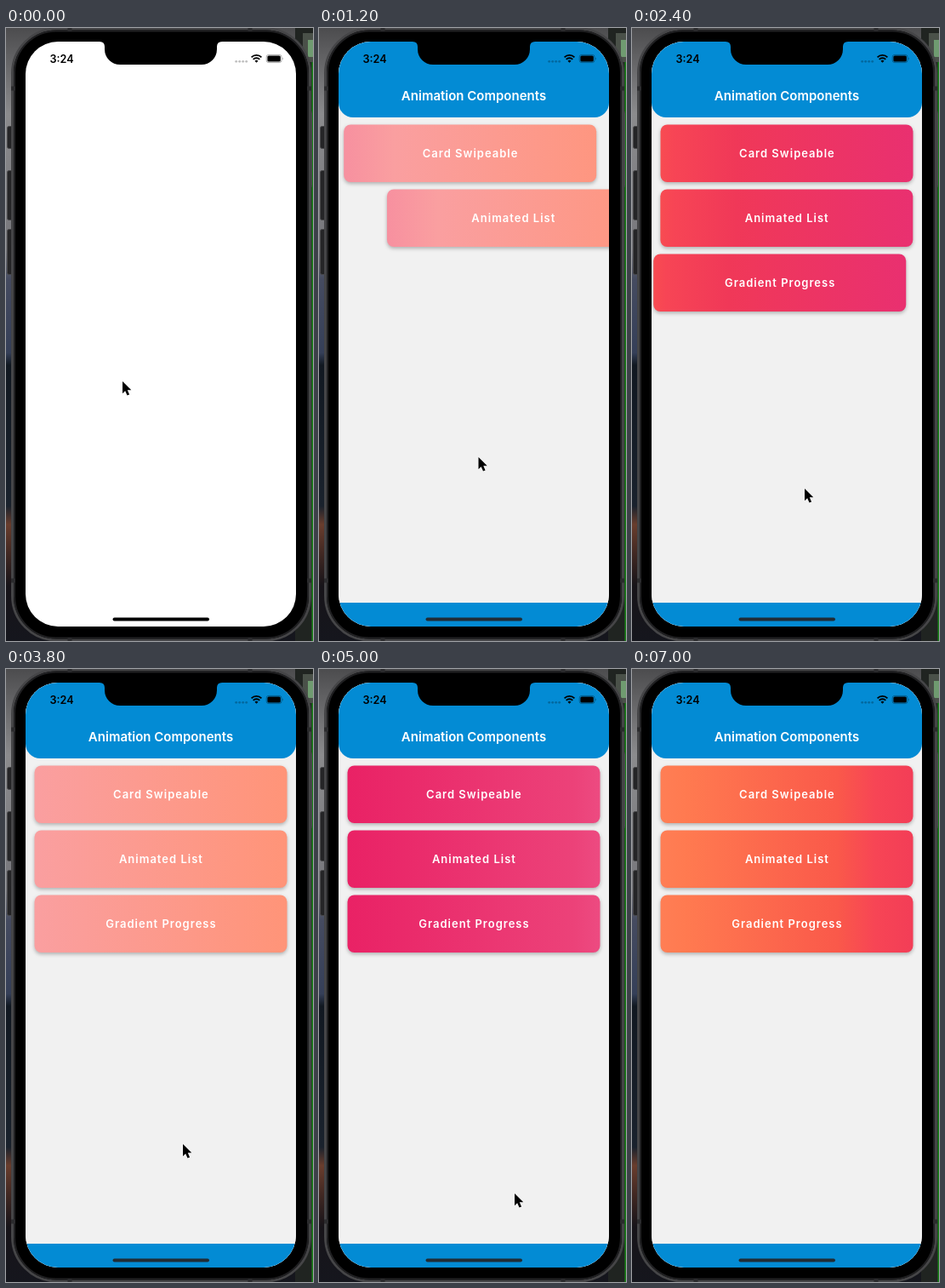
These frames come from a looping animation (361 by 720 pixels, 7100 ms). An HTML page:

```html
<!DOCTYPE html>
<html lang="en">
<head>
<meta charset="utf-8">
<title>Animation Components</title>
<style>
  html, body { margin: 0; width: 100%; height: 100%; overflow: hidden; background: #000; }
  svg { display: block; width: 361px; height: 720px; }
  text { font-family: Inter, "Open Sans", sans-serif; font-weight: 600; text-anchor: middle; }
  .card rect { fill: url(#strip); filter: drop-shadow(0 2px 2px rgba(0, 0, 0, .27)); }
  .card text { fill: #fff; font-size: 13px; letter-spacing: 1px; }
</style>
</head>
<body>
<svg viewBox="0 0 361 720">
  <defs>
    <linearGradient id="wall" x2="0" y2="1">
      <stop offset="0" stop-color="#4c4c4e"/>
      <stop offset=".14" stop-color="#8b8b8d"/>
      <stop offset=".36" stop-color="#77777c"/>
      <stop offset=".41" stop-color="#454b60"/>
      <stop offset=".53" stop-color="#353f58"/>
      <stop offset=".55" stop-color="#111821"/>
      <stop offset=".78" stop-color="#1a222d"/>
      <stop offset=".81" stop-color="#693d2d"/>
      <stop offset=".86" stop-color="#3f2722"/>
      <stop offset=".91" stop-color="#171419"/>
      <stop offset="1" stop-color="#15161d"/>
    </linearGradient>
    <linearGradient id="strip"></linearGradient>
    <clipPath id="screen"><rect x="23" y="16" width="318" height="687" rx="38"/></clipPath>
  </defs>

  <rect width="361" height="720" fill="url(#wall)"/>
  <rect x="340" width="21" height="720" fill="#202421"/>
  <rect x="349" y="6" width="12" height="34" fill="#4a5149"/>
  <rect x="355" y="14" width="6" height="20" fill="#6f9b70"/>
  <rect x="359.5" y="40" width="1.5" height="680" fill="#168016"/>

  <g fill="#252527" stroke="#49494b">
    <rect x="1.5" y="115.5" width="8" height="26" rx="2"/>
    <rect x="1.5" y="167.5" width="8" height="58" rx="2"/>
    <rect x="1.5" y="236.5" width="8" height="53" rx="2"/>
    <rect x="352" y="97.5" width="7.5" height="90" rx="2"/>
  </g>
  <rect x="7.5" y="1" width="350" height="718" rx="52" fill="#000" stroke="#454547" stroke-width="3"/>
  <rect x="10" y="3.5" width="345" height="713" rx="49" fill="none" stroke="#202022" stroke-width="2"/>
  <path d="M75 0v4M287 0v4M75 716v4M287 716v4M6 71h5M354 71h5M6 649h5M354 649h5" stroke="#2b2b2d" stroke-width="5"/>

  <g clip-path="url(#screen)">
    <rect x="23" y="16" width="318" height="687" fill="#fff"/>
    <rect x="125.5" y="692.5" width="113.5" height="4" rx="2"/>
    <g id="app">
      <rect x="23" y="16" width="318" height="687" fill="#f1f1f1"/>
      <rect x="23" y="0" width="318" height="105" rx="17" fill="#038bd4"/>
      <text x="182" y="84.7" font-size="15" fill="#fff">Animation Components</text>
      <g id="cards"></g>
      <rect x="23" y="675" width="318" height="28" fill="#038bd4"/>
      <rect x="125.5" y="692.5" width="113.5" height="4" rx="2" fill="#202c35"/>
    </g>
    <path d="M108 15h148v1h-2q-6 0-6 6v3a18 18 0 0 1-18 18h-96a18 18 0 0 1-18-18v-3q0-6-6-6h-2z"/>
    <text x="65.6" y="41" font-size="12.6">3:24</text>
    <g opacity=".25">
      <circle cx="270.7" cy="39.3" r="1.4"/><circle cx="274.7" cy="39.3" r="1.4"/>
      <circle cx="278.7" cy="39.3" r="1.4"/><circle cx="282.7" cy="39.3" r="1.4"/>
    </g>
    <path d="M294.5 40.8l-2-2.1a2.8 2.8 0 0 1 4 0z"/>
    <path d="M290.7 36.8a5.4 5.4 0 0 1 7.6 0M288.6 34.3a8.3 8.3 0 0 1 11.8 0" fill="none" stroke="#000" stroke-width="1.8"/>
    <rect x="306.2" y="31.4" width="17.8" height="9.2" rx="2.6" fill="none" stroke="#000" stroke-opacity=".4" stroke-width=".8"/>
    <rect x="307.4" y="32.6" width="15.4" height="6.8" rx="1.5"/>
    <path d="M325 34.5q1.4 1.5 0 3z" opacity=".5"/>
  </g>

  <path id="cursor" d="M0 0v14.2l3.2-3 2.3 5.3 2.6-1.1-2.3-5.2h4.5z" stroke="#fff" stroke-width="1" paint-order="stroke"/>
</svg>

<script>
const LOOP = 7100, STEP = 100, MOUNT = 300;
const $ = id => document.getElementById(id);

// One long colour strip slides back and forth behind every card.
const STRIP_SPAN = 1.2, CARD_SPAN = 0.2, SWEEP = 2500, SWEEP_START = 50;
const strip = [
  [0, "#e91e63"], [.2, "#ec4279"], [.25, "#ee588d"], [.37, "#f06f9e"],
  [.5, "#fa9fa0"], [.7, "#ff9478"], [.75, "#ff845c"], [.8, "#ff7a50"],
  [.92, "#fa594a"], [.95, "#f74555"], [1, "#f03858"], [1.14, "#e93070"]
];
$("strip").innerHTML = strip.map(([at, color]) =>
  `<stop offset="${at / STRIP_SPAN}" stop-color="${color}"/>`).join("");

const cards = [["Card Swipeable", 347], ["Animated List", 880], ["Gradient Progress", 1695]];
$("cards").innerHTML = cards.map(([label], i) => `<g class="card">
  <rect x="33.5" y="${113.5 + 76 * i}" width="297" height="67.5" rx="8"/>
  <text x="182.4" y="${152 + 76 * i}">${label}</text></g>`).join("");

const cursorPath = [
  [0, 137, 415], [500, 182, 491], [1900, 193, 517], [2400, 203, 541],
  [3800, 208, 558], [5000, 230, 616], [6300, 262, 724], [LOOP, 262, 724]
];

// Underdamped spring: stiffness 100, damping 10, mass 1.
function slideIn(ms) {
  const s = Math.max(0, ms) / 1000, w = Math.sqrt(75);
  return -318 * Math.exp(-5 * s) * (Math.cos(w * s) + 5 / w * Math.sin(w * s));
}

function cursorAt(t) {
  const i = cursorPath.findIndex(p => p[0] > t);
  const [t0, x0, y0] = cursorPath[i - 1], [t1, x1, y1] = cursorPath[i];
  const k = (t - t0) / (t1 - t0);
  return [x0 + (x1 - x0) * k, y0 + (y1 - y0) * k];
}

function draw(t) {
  $("app").style.display = t < MOUNT ? "none" : "";
  const turn = (t - SWEEP_START + 2 * SWEEP) % (2 * SWEEP) / SWEEP;
  const left = -(1 - Math.abs(1 - turn)) / CARD_SPAN;
  $("strip").setAttribute("x1", left);
  $("strip").setAttribute("x2", left + STRIP_SPAN / CARD_SPAN);
  [...$("cards").children].forEach((card, i) =>
    card.setAttribute("transform", `translate(${slideIn(t - cards[i][1])})`));
  $("cursor").setAttribute("transform", `translate(${cursorAt(t)})`);
}

const start = performance.now();
function tick() {
  const t = (performance.now() - start) % LOOP;
  draw(Math.floor(t / STEP) * STEP);
  requestAnimationFrame(tick);
}
tick();
</script>
</body>
</html>
```
